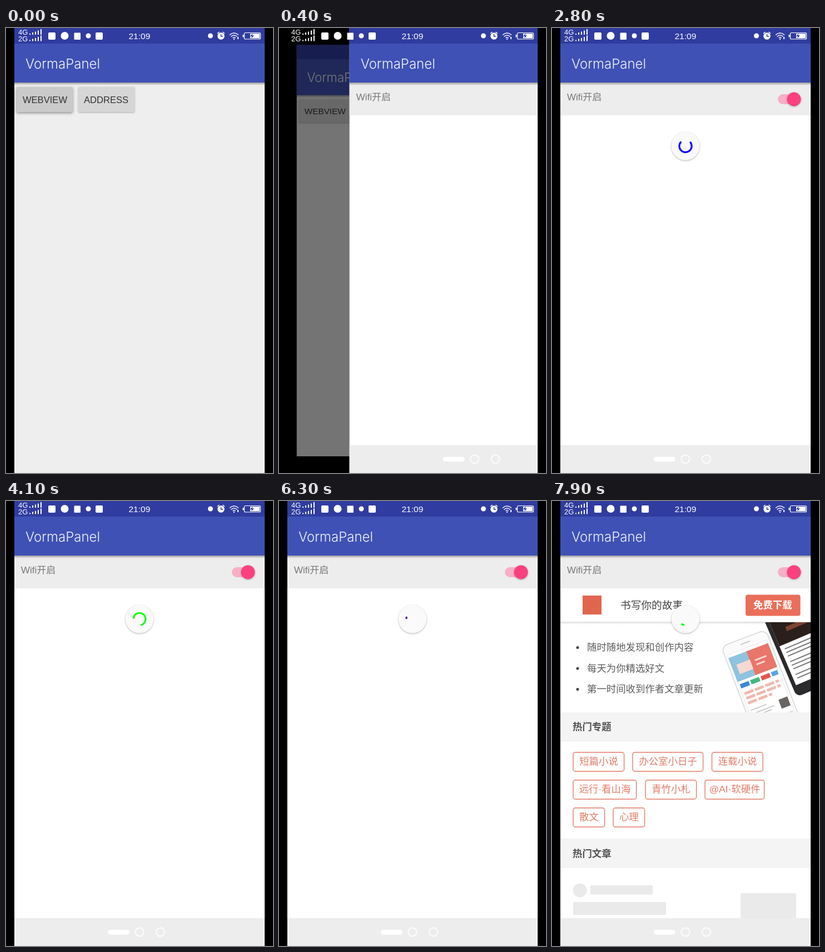
Write an HTML page that moves like this. It is 480 px wide and 800 px high and loops after 8 s.

```html
<!DOCTYPE html>
<html lang="zh-CN">
<head>
<meta charset="utf-8">
<title>Loading a page</title>
<style>
  html, body { margin: 0; width: 100%; height: 100%; overflow: hidden; background: #000; }
  svg { display: block; width: 100%; height: 100%; }
  text { font-family: "Liberation Sans", "Noto Sans CJK SC", "Noto Sans CJK", sans-serif; }
  .title { font: 300 24px Inter, "Liberation Sans", sans-serif; fill: #f2f3fa; }
  .button { font-size: 16.6px; fill: #333; text-anchor: middle; }
  .body { font-size: 17.4px; fill: #5c5c5c; }
  .strong { font-size: 17.4px; font-weight: bold; fill: #505050; }
  .chip rect { fill: none; stroke: #e27c67; stroke-width: 1.4; }
  .chip text { font-size: 17.4px; fill: #e27c67; text-anchor: middle; }
  .lift { filter: drop-shadow(0 1.5px 1.5px rgba(0, 0, 0, .3)); }
</style>
</head>
<body>
<svg viewBox="0 0 480 800">
  <defs>
    <linearGradient id="shade" x2="0" y2="1">
      <stop stop-color="#000" stop-opacity=".35"/>
      <stop offset="1" stop-color="#000" stop-opacity="0"/>
    </linearGradient>
    <clipPath id="heroClip"><path d="M300 218h165v162H300z"/></clipPath>
    <g id="bar">
      <path fill="#303c9f" d="M15 0h450v28H15z"/>
      <path fill="#3f51b5" d="M15 28h450v70H15z"/>
      <path fill="url(#shade)" d="M15 98h450v5H15z"/>
      <text class="title" x="35" y="72.500">VormaPanel</text>
    </g>
  </defs>

  <g id="home">
    <path fill="#eee" d="M15 0h450v800H15z"/>
    <use href="#bar"/>
    <rect id="pressed" class="lift" x="19" y="106" width="101" height="45" rx="2"/>
    <rect class="lift" x="130" y="106" width="101" height="45" rx="2" fill="#d6d6d6"/>
    <text class="button" x="70" y="135">WEBVIEW</text>
    <text class="button" x="180" y="135">ADDRESS</text>
    <path id="dim" d="M15 0h450v800H15z"/>
  </g>

  <g id="browser">
    <path fill="#fff" d="M15 0h450v800H15z"/>
    <path fill="#ededed" d="M15 98h450v59H15z"/>
    <use href="#bar"/>
    <text x="27" y="130" font-size="17" fill="#777">Wifi开启</text>
    <rect x="406" y="119" width="38" height="18" rx="9" fill="#f6afc5"/>
    <circle class="lift" cx="435" cy="128" r="12.500" fill="#fb4080"/>

    <g id="page">
      <path fill="url(#shade)" opacity=".4" d="M15 217h450v5H15z"/>
      <rect x="55" y="170" width="34" height="34" fill="#e2654f"/>
      <text x="123" y="194" font-size="18.700" fill="#444">书写你的故事</text>
      <rect x="348" y="168.500" width="98.500" height="38" rx="4" fill="#ea6f5a"/>
      <text class="strong" x="362" y="193" style="fill:#fff">免费下载</text>
      <g id="points"></g>
      <path fill="#f4f4f4" d="M15 380h450v52.500H15z"/>
      <text class="strong" x="37" y="412">热门专题</text>
      <g id="chips" class="chip"></g>
    </g>

    <g id="late">
      <g clip-path="url(#heroClip)">
        <g transform="translate(383 218) rotate(-23)">
          <rect y="-60" width="130" height="206" rx="10" fill="#2b2b2d"/>
          <path fill="#fff" d="M7-60h120v186H7z"/>
          <path fill="#2b1f1c" d="M7-20h120v70H7z"/>
          <path fill="#7d4430" d="M30 22h70v8H30z"/>
          <path stroke="#777" stroke-width="2" stroke-dasharray="52 3 20 4"
            d="M14 58h80M14 65h80M14 72h54M14 83h80M14 90h80M14 97h70M14 108h80M14 115h60"/>
        </g>
        <g transform="translate(304 262) rotate(-21)">
          <rect width="86" height="210" rx="12" fill="#fbfbfc" stroke="#d5d7da" stroke-width="1.500"/>
          <path stroke="#ccc" stroke-width="2" d="M34 9h18"/>
          <path fill="#fff" stroke="#e8e8e8" d="M5 18h76v180H5z"/>
          <path fill="#8fc3df" d="M5 24h34v46H5z"/>
          <path fill="#e8766b" d="M39 24h42v46H39z"/>
          <path fill="#f6d9d2" d="M14 40h26v18H14zM48 43h22v3H48zM48 51h16v3H48z"/>
          <path fill="#3f86d8" d="M7 75h17v8H7z"/>
          <path fill="#43b883" d="M27 75h17v8H27z"/>
          <path fill="#e4574f" d="M47 75h17v8H47z"/>
          <path fill="#55a7e0" d="M67 75h12v8H67z"/>
          <path stroke="#f0b8ad" stroke-width="5" stroke-dasharray="17 3"
            d="M9 94h66M9 103h66M9 112h46"/>
          <path stroke="#bbb" stroke-width="1.500" d="M9 126h30M9 133h42M9 138h36M9 154h30M9 161h42M9 166h36"/>
          <path fill="#686461" d="M62 126h17v17H62z"/>
          <path fill="#ddd" d="M62 153h17v17H62z"/>
        </g>
      </g>
      <path fill="#f4f4f4" d="M15 607h450v53H15z"/>
      <text class="strong" x="37" y="639.500">热门文章</text>
      <g fill="#eaeaea">
        <circle cx="50" cy="700" r="12.500"/>
        <path d="M69 691h112v16.500H69zM38 721h167v23H38z"/>
        <rect x="339" y="705" width="100" height="60" rx="4"/>
      </g>
    </g>

    <path fill="#ededed" d="M15 750h450v50H15z"/>
    <rect x="183" y="771" width="39" height="8.500" rx="4.200" fill="#fff"/>
    <g fill="none" stroke="#fafafa" stroke-width="2.500">
      <circle cx="240" cy="775" r="7.500"/>
      <circle cx="277.500" cy="775" r="7.500"/>
    </g>

    <g id="loader">
      <circle class="lift" r="25.300" fill="#fafafa"/>
      <path id="arc" fill="none" stroke-width="3.100" stroke-linecap="square"/>
    </g>
  </g>

  <path d="M465 0h15v800h-15z"/>
  <g id="status" fill="#fff">
    <g font-size="13">
      <text x="22" y="11.500">4G</text>
      <text x="22" y="23.500">2G</text>
    </g>
    <path d="M42 10h2v2h-2zM47 8h2v4h-2zM52 6.500h2v5.500h-2zM57 4.500h2V12h-2zM62 2h2v10h-2z"/>
    <path d="M42 21.500h2v2h-2zM47 19.500h2v4h-2zM52 18h2v5.500h-2zM57 16h2v7.500h-2zM62 13.500h2v10h-2z"/>
    <rect x="76" y="8" width="13" height="13" rx="2"/>
    <circle cx="105.500" cy="14" r="7"/>
    <rect x="122.500" y="8.500" width="11.500" height="12.500" rx="1"/>
    <circle cx="148" cy="14" r="4.500"/>
    <rect x="161" y="8" width="13" height="13" rx="2"/>
    <text x="220.500" y="20" font-size="15.500">21:09</text>
    <circle cx="367.500" cy="14" r="4.500"/>
    <circle cx="386.500" cy="14.500" r="6.300"/>
    <g fill="none" stroke="#fff" stroke-width="1.500">
      <path d="M380 10l3.500-3M393 10l-3.500-3"/>
      <path stroke="#303c9f" d="M386.500 11v4h3.500"/>
      <path d="M402 12.500q8-7 16 0M404.500 15.500q5.500-5 11 0M407.500 18q2.500-2.500 5 0"/>
      <rect x="428.500" y="8.500" width="29" height="11.500" rx="2" stroke-width="1.200"/>
    </g>
    <path d="M409 19h2v2h-2zM416 16h2v4h-2zM425.500 12h2v4.500h-2zM439 10h17v8.500h-17z"/>
    <path fill="#303c9f" d="M443 10l-4 5h3l-1 3.500 5-5h-3z"/>
  </g>
</svg>
<script>
const $ = id => document.getElementById(id);
const LOOP = 8000, STEP = 100;
const CYCLE = 1332, SPIN_START = 1070;
const COLORS = [[255, 0, 0], [0, 0, 255], [0, 255, 0]];

$('points').innerHTML = ['随时随地发现和创作内容', '每天为你精选好文', '第一时间收到作者文章更新']
  .map((s, i) => `<circle cx="46" cy="${263.5 + i * 37.5}" r="2.5" fill="#444"/>
    <text class="body" x="63" y="${269 + i * 37.5}">${s}</text>`).join('');

const chips = [
  [38, 451, 92, '短篇小说'], [145, 451, 127, '办公室小日子'], [287.5, 451, 92, '连载小说'],
  [38, 501, 114, '远行·看山海'], [168, 501, 92, '青竹小札'], [275, 501, 107, '@AI·软硬件'],
  [38, 551, 57, '散文'], [110, 551, 57, '心理']
];
$('chips').innerHTML = chips.map(([x, y, w, s]) =>
  `<rect x="${x}" y="${y + .7}" width="${w - .4}" height="34.3" rx="4"/>
   <text x="${x + w / 2}" y="${y + 23}">${s}</text>`).join('');

const clamp = v => Math.min(1, Math.max(0, v));
const smooth = v => .5 - .5 * Math.cos(Math.PI * clamp(v));

// cubic-bezier(.4, 0, .2, 1)
function fastOutSlowIn(x) {
  let lo = 0, hi = 1;
  for (let i = 0; i < 20; i++) {
    const m = (lo + hi) / 2, n = 1 - m;
    if (1.2 * n * n * m + .6 * n * m * m + m ** 3 < x) lo = m; else hi = m;
  }
  return 3 * (1 - lo) * lo * lo + lo ** 3;
}

function drawArc(time) {
  const arc = $('arc');
  if (time <= 0) return arc.setAttribute('d', '');
  const turn = Math.floor(time / CYCLE), phase = time / CYCLE - turn;
  const base = turn * 1.65 + phase * .85;
  const tail = base + .8 * fastOutSlowIn(clamp(phase * 2 - 1));
  const head = base + .8 * fastOutSlowIn(clamp(phase * 2)) + .002;
  const at = a => `${11.1 * Math.cos(a * 2 * Math.PI)} ${11.1 * Math.sin(a * 2 * Math.PI)}`;
  arc.setAttribute('d', `M${at(tail)}A11.1 11.1 0 ${head - tail > .5 ? 1 : 0} 1 ${at(head)}`);
  const mix = clamp(phase * 4 - 3), next = COLORS[(turn + 1) % 3];
  const rgb = COLORS[turn % 3].map((c, i) => Math.round(c + (next[i] - c) * mix));
  arc.setAttribute('stroke', `rgb(${rgb})`);
}

function draw(t) {
  const slide = smooth((t - 60) / 509), scale = 1 - .1 * slide;
  $('home').setAttribute('transform', `translate(240 400) scale(${scale}) translate(-240 -400)`);
  $('home').style.display = slide < 1 ? '' : 'none';
  $('dim').setAttribute('opacity', slide * .68);
  $('pressed').setAttribute('fill', t < 200 ? '#cacaca' : '#d6d6d6');
  $('pressed').style.filter = t < 200 ? 'drop-shadow(0 2.5px 2.5px rgba(0, 0, 0, .4))' : '';
  $('browser').setAttribute('transform', `translate(${450 * (1 - slide)} 0)`);
  $('browser').style.display = slide > 0 ? '' : 'none';
  $('loader').setAttribute('transform', `translate(240 212.3) scale(${smooth((t - 520) / 400)})`);
  // the spinner stalls briefly while the page renders
  drawArc(t - SPIN_START - (t >= 7000 ? 85 : 0));
  $('page').style.display = t >= 7000 ? '' : 'none';
  $('late').style.display = t >= 7400 ? '' : 'none';
}

const start = performance.now();
function frame() {
  const t = (performance.now() - start) % LOOP;
  draw(Math.floor(t / STEP) * STEP);
  requestAnimationFrame(frame);
}
frame();
</script>
</body>
</html>
```
